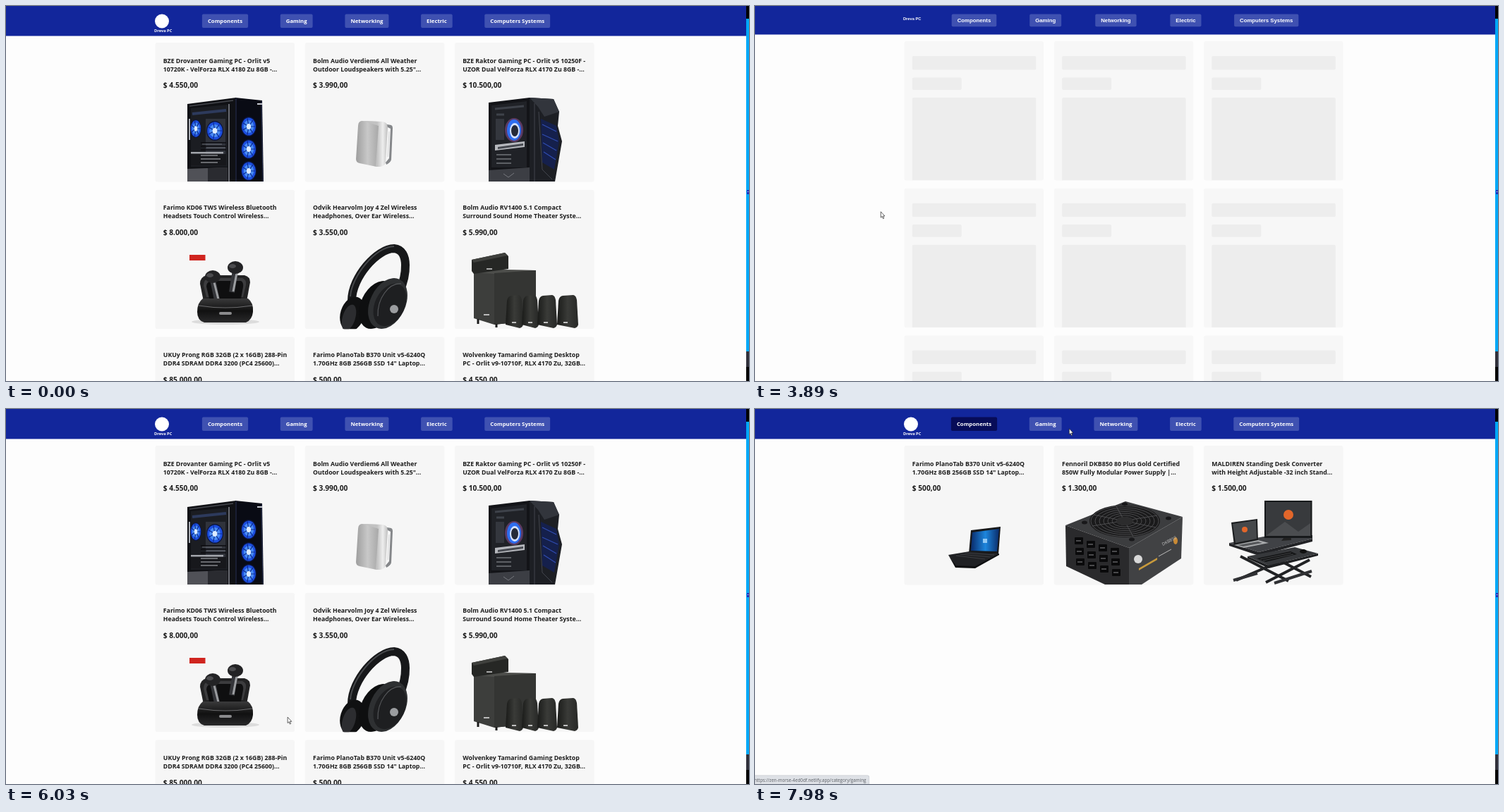
Animation, 1053 px wide and 532 px high, one loop 8000 ms. Source, as an HTML page with a canvas:

```html
<!DOCTYPE html>
<html lang="en">
<head>
<meta charset="utf-8">
<title>Computer shop</title>
<style>
  html, body { margin: 0; width: 100%; height: 100%; overflow: hidden; background: #fdfdfd; }
  canvas { display: block; }
</style>
</head>
<body>
<canvas id="stage" width="1053" height="532"></canvas>
<script>
const ctx = document.getElementById('stage').getContext('2d');
const LOOP = 8000;
const SANS = '"Open Sans", sans-serif', FALLBACK = '"Liberation Sans", Arial, sans-serif';
const COLS = [211.5, 423.8, 636], ROW_STEP = 208.7, CARD = 197.5;

// ---------- drawing helpers ----------
function fill(color, d) {
  ctx.fillStyle = color;
  ctx.fill(new Path2D(d));
}
function line(color, width, d) {
  ctx.strokeStyle = color;
  ctx.lineWidth = width;
  ctx.stroke(new Path2D(d));
}
function box(color, x, y, w, h, r = 0) {
  ctx.fillStyle = color;
  ctx.beginPath();
  ctx.roundRect(x, y, w, h, r);
  ctx.fill();
}
function oval(color, x, y, rx, ry = rx, turn = 0) {
  ctx.fillStyle = color;
  ctx.beginPath();
  ctx.ellipse(x, y, rx, ry, turn, 0, 7);
  ctx.fill();
}
function text(str, x, y, font, color = '#1c1c1c', align = 'left') {
  ctx.font = font;
  ctx.fillStyle = color;
  ctx.textAlign = align;
  ctx.fillText(str, x, y);
}
function shade(x0, y0, x1, y1, ...colors) {
  const g = ctx.createLinearGradient(x0, y0, x1, y1);
  colors.forEach((c, i) => g.addColorStop(i / (colors.length - 1), c));
  return g;
}
function fan(x, y, rx, ry) {
  oval('#0a1440', x, y, rx, ry);
  oval('#1c4fe0', x, y, rx * .9, ry * .9);
  oval('#4a8cf2', x, y, rx * .65, ry * .65);
  for (let a = 0; a < 6.2; a += .9)
    line('#0c2a8c', 1.2, `M${x} ${y}L${x + rx * .85 * Math.cos(a)} ${y + ry * .85 * Math.sin(a)}`);
  oval('#dcecff', x, y, rx * .28, ry * .28);
}

// ---------- product pictures ----------
function blueTower() {
  fill('#101115', 'M257 139L326 130V249H257Z');
  fill('#1b1d22', 'M262 145L314 140V228H262Z');
  line('#44464c', 1.5, 'M260 142L322 134');
  line('#2d3a5c', 4, 'M264 153L312 148');
  box('#30333b', 283, 160, 28, 66);
  line('#a9adb5', 2, 'M260 160V190');
  fan(269, 174, 8, 13);
  fan(296, 177, 12, 14);
  line('#0c0d10', 1.5, 'M276 194H312M276 199H312M276 204H312');
  line('#6d7078', 1, 'M278 196H306M284 201H311');
  box('#a3a6ac', 262, 207, 46, 2.5);
  box('#17181c', 262, 210, 50, 16);
  line('#b9bcc2', 1.2, 'M276 212H300M276 217H304M276 222H300');
  fill('#505157', 'M257 231L314 229V249H257Z');
  fill('#2a2b30', 'M286 230L314 229V249H286Z');
  line('#8a8d95', 1.5, 'M316 139V249');
  fill('#090b14', 'M325 130L363 134L365 249H325Z');
  line('#2b3352', 1, 'M326 131V249M362 135L364 249');
  for (const y of [171, 203, 234]) fan(344, y, 11, 14);
  box('#c9ccd4', 356, 138, 7, 2);
}
function wallSpeaker() {
  fill(shade(497, 0, 528, 0, '#a0a0a0', '#c8c8c8', '#a8a8a8'), 'M504 163Q499 164 499 170L496 217Q496 222 501 223L525 228L530 168Q530 164 526 164Z');
  fill(shade(526, 0, 542, 0, '#c2c2c2', '#eeeeee', '#b8b8b8'), 'M506 163L534 164Q542 166 541 173L538 222Q537 227 530 228H524L528 170Z');
  fill('#85878a', 'M540 168L546 169Q548 170 548 173L546 218Q545 222 539 225L538 222L543 216L545 174L541 172Z');
  line('#d4d5d6', 1, 'M543 178L541 214');
}
function darkTower() {
  fill('#131418', 'M684 137L742 130V249H684Z');
  fill('#202227', 'M688 141L738 135V229H688Z');
  line('#3e424a', 3, 'M693 146L734 142M695 154H706M695 163H704');
  box('#34373e', 694, 160, 12, 30);
  oval('#5c3a62', 720, 176, 13, 17);
  oval('#2e6ef0', 720, 176, 10, 15);
  oval('#d5e2ff', 721, 177, 7, 11);
  oval('#252a38', 721, 177, 5, 8);
  fill('#b6b8bd', 'M693 197L735 192V200L693 205Z');
  fill('#45484f', 'M697 200L733 195V198L697 203Z');
  line('#9a9da4', 1.2, 'M695 211H716M695 217H716M695 223H716');
  fill('#3c3e44', 'M684 233L742 229V249H684Z');
  line('#77797f', 1, 'M705 238L712 243L720 237');
  fill('#1d1f24', 'M742 130L776 132L784 150L782 170L788 192L778 249H742Z');
  fill('#32353c', 'M742 130L776 132L784 150L763 157L754 143Z');
  fill('#15204c', 'M758 160L780 170L784 192L777 232L760 222Z');
  line('#2f4bb0', 1.2, 'M760 168L780 178M760 182L782 192M761 194L780 205M762 207L779 218');
  line('#42454d', 1, 'M749 138V249M755 150L760 232L774 246');
}
function earbud(x, y, stemX, bottom) {
  line('#35363a', 8, `M${x} ${y + 4}L${stemX} ${bottom}`);
  line('#9b9da0', 3, `M${x + 2} ${y + 8}L${stemX + 2} ${bottom - 1}`);
  oval('#232325', x, y, 11, 9);
  oval('#4b4b4e', x - 4, y - 2, 5, 3);
}
function earbuds() {
  box('#d0251f', 260, 353, 22.5, 8);
  oval('#dcdcdc', 311, 448, 48, 4);
  fill('#232324', 'M285 382H338Q346 384 346 392L341 419H280L275 394Q275 384 285 382Z');
  fill('#3c3c3e', 'M287 386H335Q341 388 340 396L336 413H284L280 397Q280 388 287 386Z');
  fill('#0f0f10', 'M290 390H333Q337 392 336 399L333 415H288L284 398Q284 392 290 390Z');
  earbud(293, 384, 299, 417);
  earbud(325, 371, 320, 406);
  fill(shade(0, 415, 0, 450, '#3a3a3b', '#111', '#2b2b2c'), 'M279 415H343Q351 421 350 434Q349 445 340 449H281Q271 446 271 434Q271 421 279 415Z');
  line('#6a6a6c', 1.2, 'M273 425Q311 431 349 425');
  box('#8a8a8c', 302, 434, 18, 4, 2);
}
function headphones() {
  line('#17181a', 12, 'M490 418C490 385 526 344 550 344C573 346 567 384 558 404');
  line('#46484b', 2, 'M488 412C490 383 524 341 550 341');
  oval('#101112', 491, 437, 17, 25, .3);
  oval('#2c2d30', 486, 442, 9, 19, .3);
  oval('#0e0f10', 526, 424, 23, 36, .45);
  oval('#2e3032', 541, 422, 25, 38, .45);
  oval('#1e1f21', 544, 424, 21, 32, .45);
  line('#55575a', 1.2, 'M527 440C526 415 542 393 560 394');
  oval('#9b9da0', 550, 430, 6);
}
function theater() {
  fill('#3d3e3c', 'M663 378L692 374L751 375V446L692 452L663 443Z');
  fill('#4d4e4b', 'M663 378L692 374L751 375L692 380Z');
  fill('#343533', 'M692 379L751 375V446L692 452Z');
  line('#1a1a1a', 3, 'M669 444V451M695 451V456M747 445V449');
  box('#bbb', 677, 437, 8, 2);
  fill('#262725', 'M660 360L707 350L712 355V373L663 380L660 376Z');
  fill('#3f403d', 'M660 360L707 350L711 354L663 364Z');
  box('#aaa', 681, 372, 8, 2);
  for (const [x, w] of [[708, 25], [731, 24], [753, 28], [781, 30]]) {
    fill(shade(x, 0, x + w, 0, '#191a18', '#3a3b38', '#272826'), `M${x + 2} 418Q${x + 3} 412 ${x + 8} 411L${x + w - 7} 410Q${x + w - 3} 411 ${x + w - 2} 417L${x + w} 452Q${x + w - 1} 456 ${x + w - 5} 457L${x} 452Z`);
    box('#c0c0c0', x + 9, 448, 6, 2);
  }
}
function laptop() {
  fill('#17181a', 'M306 172L348 167L345 206L303 205Z');
  fill(shade(307, 0, 346, 0, '#0a2f70', '#1d86dd', '#0a2c6a'), 'M308 175L346 170L343 202L306 201Z');
  box('#8fc8f4', 323, 184, 6, 6);
  fill('#202124', 'M274 207L304 202L345 206L312 224L285 223Z');
  line('#3d3e42', 1, 'M285 208L326 213M291 206L333 210M297 204L339 207');
  fill('#0e0f10', 'M274 207L285 222L312 223L346 205V207L312 226L284 225Z');
}
function powerSupply() {
  fill('#3c3d3f', 'M440 165L525 131L606 153L530 197Z');
  fill('#2a2a2c', 'M440 165L530 197V249H496L441 223Z');
  fill('#414244', 'M530 197L606 153L604 212L548 249H530Z');
  oval('#1a1a1b', 524, 159, 50, 23);
  ctx.strokeStyle = '#58595b';
  ctx.lineWidth = .8;
  for (let k = 1; k < 9; k++) {
    ctx.beginPath();
    ctx.ellipse(524, 159, k * 6, k * 2.7, 0, 0, 7);
    ctx.stroke();
  }
  line('#58595b', .8, 'M480 150L568 168M478 166L570 151M512 138L536 181');
  oval('#2c2c2d', 524, 159, 12, 6);
  for (const [x, y] of [[467, 161], [534, 185], [586, 155], [524, 135]]) oval('#18181a', x, y, 4, 2.5);
  for (let r = 0; r < 3; r++)
    for (let c = 0; c < 4; c++) {
      box('#0a0a0b', 453 + c * 17 + r, 182 + r * 15 + c * 5, 12, 10, 1);
      box('#4a4a4c', 455 + c * 17 + r, 186 + r * 15 + c * 5, 7, 2);
    }
  oval('#d8d8d8', 543, 213, 6);
  fill('#c89a3c', 'M544 226L570 211V214L544 229Z');
  line('#bbb', 1, 'M572 209L590 199');
  oval('#c98a35', 596, 187, 3, 5);
  ctx.save();
  ctx.translate(578, 194);
  ctx.rotate(-.48);
  text('DKB850', 0, 0, `6px ${SANS}`, '#ccc');
  ctx.restore();
}
function standingDesk() {
  line('#222325', 4, 'M688 209L756 244M756 211L682 243M724 246L786 214M788 238L738 212');
  line('#303134', 4, 'M678 243L712 233M736 247L789 230');
  fill('#404246', 'M672 190L732 179H790L790 184L714 203Z');
  fill('#222326', 'M672 190L714 203L790 184V188L714 208L672 194Z');
  fill('#36383b', 'M698 209L765 196L798 205L728 222Z');
  fill('#1d1e20', 'M698 209L728 222L798 205V208L728 226L698 212Z');
  fill('#131415', 'M711 212L759 202L768 206L724 217Z');
  line('#4c4d50', .8, 'M716 213L760 204M720 215L763 206');
  oval('#111', 777, 202, 5, 3);
  fill('#222', 'M753 178H759L760 186L746 187Z');
  box('#17191b', 722, 130, 67.5, 53);
  box('#383a3d', 724, 132, 63.5, 48);
  fill('#4b4d50', 'M724 180L751 160L770 174L787 162V180Z');
  oval('#e2662a', 756, 150, 7);
  fill('#1b1d1f', 'M675 161L712 156L713 187L679 193Z');
  fill('#45484b', 'M677 163L710 158L711 184L681 190Z');
  oval('#e2662a', 694, 171, 4);
  fill('#a9abad', 'M679 193L713 186L728 190L693 197Z');
  fill('#55575a', 'M684 193L713 188L719 190L692 195Z');
}

// ---------- page data ----------
const farimo = ['Farimo PlanoTab B370 Unit v5-6240Q', '1.70GHz 8GB 256GB SSD 14" Laptop...', '500,00', laptop];
const HOME = [
  ['BZE Drovanter Gaming PC - Orlit v5', '10720K - VelForza RLX 4180 Zu 8GB -...', '4.550,00', blueTower],
  ['Bolm Audio Verdiem6 All Weather', 'Outdoor Loudspeakers with 5.25"...', '3.990,00', wallSpeaker],
  ['BZE Raktor Gaming PC - Orlit v5 10250F -', 'UZOR Dual VelForza RLX 4170 Zu 8GB -...', '10.500,00', darkTower],
  ['Farimo KD06 TWS Wireless Bluetooth', 'Headsets Touch Control Wireless...', '8.000,00', earbuds],
  ['Odvik Hearvolm Joy 4 Zel Wireless', 'Headphones, Over Ear Wireless...', '3.550,00', headphones],
  ['Bolm Audio RV1400 5.1 Compact', 'Surround Sound Home Theater Syste...', '5.990,00', theater],
  ['UKUy Prong RGB 32GB (2 x 16GB) 288-Pin', 'DDR4 SDRAM DDR4 3200 (PC4 25600)...', '85.000,00'],
  farimo.slice(0, 3),
  ['Wolvenkey Tamarind Gaming Desktop', 'PC - Orlit v9-10710F, RLX 4170 Zu, 32GB...', '4.550,00']
];
const CATEGORY = [
  farimo,
  ['Fennoril DKB850 80 Plus Gold Certified', '850W Fully Modular Power Supply |...', '1.300,00', powerSupply],
  ['MALDIREN Standing Desk Converter', 'with Height Adjustable -32 inch Stand...', '1.500,00', standingDesk]
];
const NAV = [['Components', 310.5], ['Gaming', 411.7], ['Networking', 511.4], ['Electric', 610.4], ['Computers Systems', 724.7]];

// ---------- page parts ----------
function header(ready, dark) {
  const family = ready ? SANS : FALLBACK, mid = ready ? 21.2 : 20.4, h = ready ? 19.4 : 17.6;
  box('#12269b', 0, 0, 1049, ready ? 42.4 : 40.6);
  if (ready) oval('#fff', 221, 21.5, 10);
  text('Dreva PC', 210, ready ? 37 : 19.8, `bold 5.7px ${family}`, '#fff');
  for (const [label, x] of NAV) {
    ctx.font = `bold 7.79px ${family}`;
    const w = ctx.measureText(label).width + 16;
    box(dark.includes(label) ? '#070c58' : '#3f51b1', x - w / 2, mid - h / 2, w, h, 2);
    text(label, x, mid + 2.8, ctx.font, '#fff', 'center');
  }
}
function eachCard(count, top, draw) {
  for (let i = 0; i < count; i++) draw(COLS[i % 3], top + ROW_STEP * Math.floor(i / 3), i);
}
function skeleton(top) {
  eachCard(9, top, (x, y) => {
    box('#f7f7f7', x, y, CARD, CARD, 3);
    box('#ededed', x + 11.3, y + 21, 175.5, 19.6, 2);
    box('#ededed', x + 11.3, y + 51.4, 70, 17.6, 2);
    box('#ededed', x + 11.3, y + 80, 175.5, 117.3, [2, 2, 0, 0]);
  });
}
function products(list, withPictures = true) {
  eachCard(list.length, 52, (x, y, i) => {
    const [first, second, price, picture] = list[i];
    box('#f6f6f6', x, y, CARD, CARD, 3);
    text(first, x + 11.3, y + 28.5, `bold 8.76px ${SANS}`);
    text(second, x + 11.3, y + 40.6, `bold 8.76px ${SANS}`);
    text('$ ' + price, x + 11.3, y + 64.2, `bold 10.2px ${SANS}`);
    if (!picture || !withPictures) return;
    ctx.save();
    ctx.beginPath();
    ctx.rect(x, y, CARD, CARD);
    ctx.clip();
    picture();
    ctx.restore();
  });
}
function status(page, width) {
  box('#c8cbd0', 0, 519.6, width + .6, 13, [0, 3, 0, 0]);
  box('#dee1e6', 0, 520.2, width, 12, [0, 2.5, 0, 0]);
  text('https://zen-morse-4ed0df.netlify.app/category/' + page, -1, 528.6, `6.28px ${SANS}`, '#5a5e64');
}
function screenEdge() {
  box('#000', 1049, 0, 4, 532);
  box('#00a8f8', 1049, 18, 4, 472);
  box('#30303a', 1049, 490, 4, 22);
  box('#2030c0', 1050, 261, 3, 6);
  box('#fff', 1051, 263, 1, 1);
}

// ---------- pointer ----------
const PATH = [[390, 891, 484], [1150, 189, 291], [1290, 178, 291.5], [5190, 178, 291.5], [5810, 401, 447],
  [5970, 401, 447], [6630, 311, 24], [7510, 311, 24], [7980, 445, 27.5]];
function pointerAt(t) {
  const i = PATH.findIndex(p => p[0] > t);
  if (i < 0) return PATH.at(-1).slice(1);
  const [t0, x0, y0] = PATH[i - 1], [t1, x1, y1] = PATH[i];
  const u = (t - t0) / (t1 - t0), e = u * u * (3 - 2 * u);
  return [x0 + (x1 - x0) * e, y0 + (y1 - y0) * e];
}
function pointer(x, y, pressed) {
  if (pressed) oval('rgba(235,215,20,.75)', x, y, 6.8);
  ctx.save();
  ctx.translate(x, y);
  const arrow = 'M.3 .3V8.6L2.1 7L3.5 10.2L4.8 9.6L3.4 6.5H6Z';
  fill('#fff', arrow);
  line('#222', .7, arrow);
  ctx.restore();
}

function render(t) {
  box('#fdfdfd', 0, 0, 1053, 532);
  const [x, y] = t < 390 ? [-20, -20] : pointerAt(t);
  const overNav = y > 11.5 && y < 31;
  const dark = [];
  if (t >= 6900 || overNav && x > 278 && x < 343) dark.push('Components');
  if (overNav && x > 389 && x < 434.5) dark.push('Gaming');

  if (t >= 3760 && t < 3890) {
    box('#fefefe', 0, 0, 1049, 43);
    eachCard(9, 50, (cx, cy) => box('#fefefe', cx, cy, CARD, CARD));
  } else {
    const ready = t < 3890 || t >= 3960;
    header(ready, dark);
    if (t >= 3890 && t < 4720 || t >= 6900 && t < 7180) skeleton(ready ? 52 : 50);
    else if (t < 6900) products(HOME, t < 3760 || t >= 4850);
    else products(CATEGORY);
  }
  if (t > 7000 && x > 389) status('gaming', 161.5);
  else if (t > 6000 && (overNav || t > 6630)) status('component', 173);
  screenEdge();
  if (t >= 390) pointer(x, y, t >= 1500 && t < 1560 || t >= 6830 && t < 6900);
}

function tick() {
  render(performance.now() % LOOP);
  requestAnimationFrame(tick);
}
tick();
</script>
</body>
</html>
```
